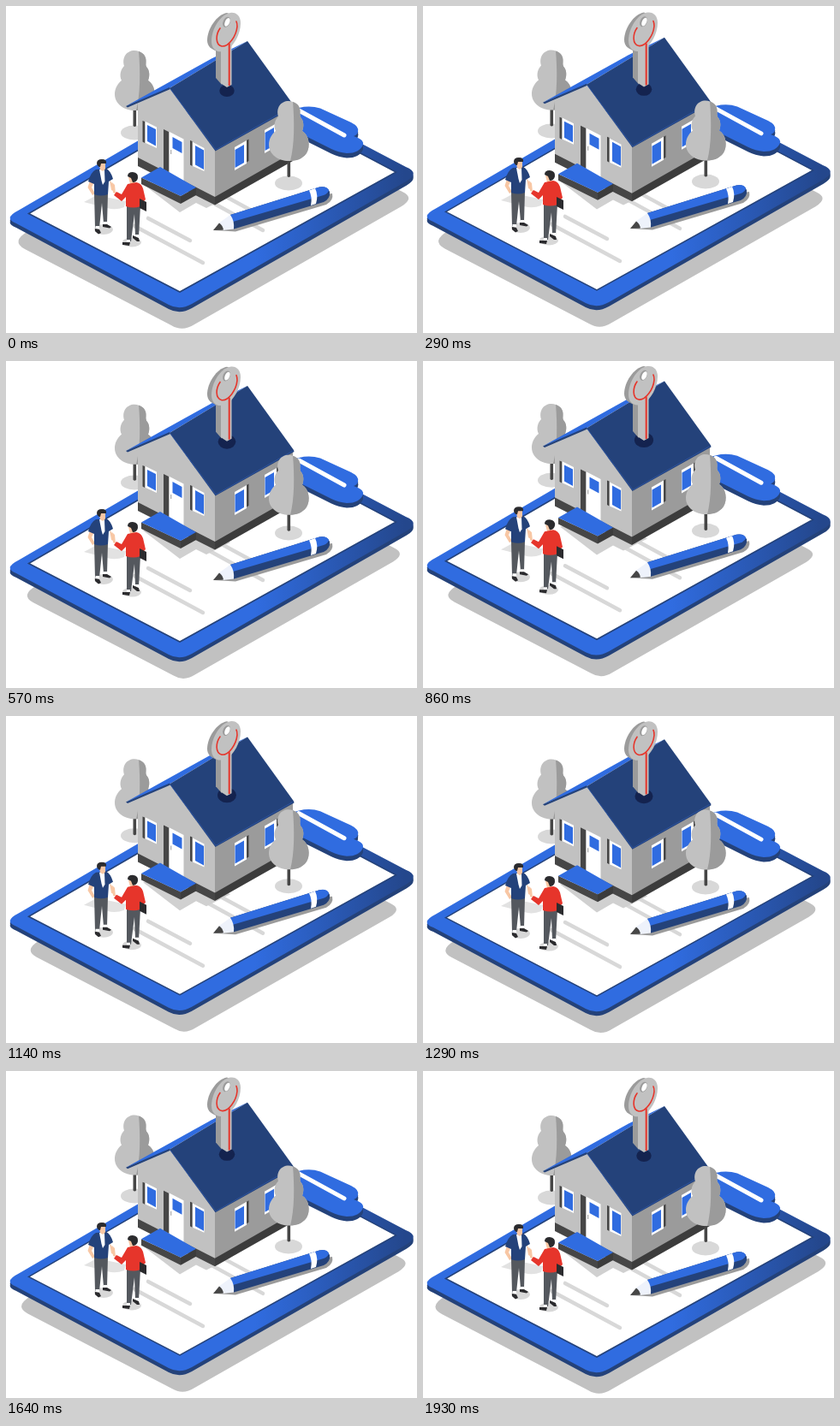
Recreate the animation shown at these times as an HTML page. Size 480 by 382 pixels, loop 2 s.

```html
<!DOCTYPE html>
<html lang="en">
<head>
<meta charset="utf-8">
<title>House on a clipboard</title>
<style>
html, body { margin: 0; width: 100%; height: 100%; overflow: hidden; background: #fff; }
svg { display: block; }
[data-lift] { transform-box: fill-box; transform-origin: center; }
.blue { fill: #306ce0; }
.navy { fill: #24427a; }
.light { fill: #c1c1c1; }
.mid { fill: #9b9b9b; }
.dark { fill: #464646; }
.white { fill: #fff; }
.skin { fill: #f8c7a4; }
.red { fill: #e6352b; }
.black { fill: #2b2b2e; }
.trousers { fill: #54585e; }
.shade { fill: #d8d8d8; }
.line { fill: none; stroke-linecap: round; stroke-linejoin: round; }
</style>
</head>
<body>
<svg width="480" height="382" viewBox="0 0 480 382">
  <defs>
    <linearGradient id="frame" gradientUnits="userSpaceOnUse" x1="290" y1="0" x2="466" y2="0">
      <stop stop-color="#306ce0"/><stop offset="1" stop-color="#24478c"/>
    </linearGradient>
    <path id="board" d="M15 238.500Q-4 248 12 254L190 349Q203 356 217 348L468 204.500Q484 195 467 188L275 87Z"/>
    <path id="clip" d="M330 123Q350 114 367 119.500L403 136Q413 141 411 147Q410 151 406 152L411 154Q418 157 417 162Q413 172 398 172Q388 171 380 167L330 142Z"/>
    <g id="tree">
      <path class="dark" d="M148.500 112h3.600v28q-1.800 2-3.600 0z"/>
      <path class="light" d="M150 52C157 52 164 57 163.500 65Q163 69 164 71C168 75 168 82 166 87C174 92 176 105 171 113C166 120 157 122 150 122C139 122 127 115 127 103C127 97 130 91 135 87C132 81 134 74 138 70C135 60 141 52 150 52Z"/>
      <path class="mid" d="M155 53C162 55 164 61 163.500 65Q163 69 164 71C168 75 168 82 166 87C174 92 176 105 171 113C166 120 159 122 152 122C157 104 157 76 155 53Z"/>
    </g>
    <g id="window">
      <path class="white" d="M267 165L281 157V184L267 192Z"/>
      <path class="blue" d="M267.500 168L278 162V183L267.500 189Z"/>
      <path class="dark" d="M281 157L283.500 155.500V181L281 182.500Z"/>
    </g>
  </defs>

  <path data-lift="0" data-grow="-0.068" class="light" d="M26 263Q5 275 22 284L193 373Q206 381 220 372L462 234Q478 224 463 217L275 118Z"/>

  <g data-lift="9">
    <ellipse class="shade" cx="150" cy="148" rx="16" ry="8.500"/>
    <use href="#board" y="5" class="navy"/>
    <use href="#board" y="2.500" class="navy"/>
    <use href="#board" fill="url(#frame)"/>
    <path class="white" stroke="#24427a" stroke-width="1.600" d="M26.500 242.500L203 334L455.500 194L275 98.500Z"/>
    <use href="#clip" y="5.500" class="navy"/>
    <use href="#clip" y="3" class="navy"/>
    <use href="#clip" class="blue"/>
    <path class="line" stroke="#fff" stroke-width="5" d="M342 122L395 151"/>
    <path class="line" stroke="#d8d8d8" stroke-width="4.500" d="M166 248L215 274M150 257L230 300M218 217L300 262M250 219L285 238"/>
    <ellipse class="shade" cx="330" cy="207" rx="16" ry="8.500"/>
  </g>

  <path data-lift="15" fill="#d0d0d0" d="M160 208L203 241L222 230L234 236L262 222L222 200Z"/>

  <use data-lift="2" href="#tree"/>

  <!-- house -->
  <g data-lift="18">
    <path class="light" d="M154 112L191 96L244 168V224L154 178Z"/>
    <path class="mid" d="M244 168L335 116V172L244 224Z"/>
    <path class="dark" d="M154 177L244 223V232.500L154 187Z"/>
    <path fill="#3c3c3c" d="M244 223L335 171V181L244 232.500Z"/>
    <path class="dark" d="M159.500 134L162 135V160L159.500 158.500Z"/>
    <path class="white" d="M163 135L176 141.500V166L163 160Z"/>
    <path class="blue" d="M165 139L175 144V163.500L165 158Z"/>
    <path class="dark" d="M184 144L190 147V194L184 191Z"/>
    <path class="white" d="M191 147L207.500 155.500V206L191 197Z"/>
    <path class="blue" d="M194.500 153L205.500 159V172L194.500 166Z"/>
    <path stroke="#aaa" stroke-width="1.200" d="M192.700 168V173"/>
    <path class="dark" d="M215 157L217.500 158V187L215 185.500Z"/>
    <path class="white" d="M218 159L231.500 166V193L218 187Z"/>
    <path class="blue" d="M221 163L231 168.500V191L221 185.500Z"/>
    <use href="#window"/>
    <use href="#window" x="35" y="-20"/>
    <path class="dark" d="M158 200.500L204 222V231L158 208Z"/>
    <path fill="#3c3c3c" d="M204 222L222 212V221L204 231Z"/>
    <path class="blue" d="M158 200.500L180 188L222 212L204 222Z"/>
    <path class="blue" d="M140 117L240 61.500L282 41L191 96Z"/>
    <path class="navy" d="M140 117L191 95L192 97L142 118.500Z"/>
    <path class="navy" d="M191 96L282 41L336 116L336.500 118L244.500 169.500Z"/>
    <path class="line" stroke="#2f57a6" stroke-width="0.800" d="M192 97L245 168L335 117"/>
  </g>

  <ellipse data-lift="7" data-grow="0.28" cx="258" cy="99" rx="8.700" ry="7" fill="#14234f"/>

  <!-- key -->
  <g data-lift="2">
    <path class="mid" d="M245 46L252 50V92L245 84Z"/>
    <path class="light" d="M251 46L263.500 42V92L258 95L251 90.500Z"/>
    <path class="mid" d="M258 8C246 10 235 27 235 40C235 47 240 51 247 53L258 51L268 12Z"/>
    <path class="light" d="M262 8C269 7 274 12 274 20C274 33 266 47 257 52C247 56 240 51 240 41C240 27 250 10 262 8Z"/>
    <g transform="rotate(24 258 19)">
      <ellipse class="mid" cx="257.500" cy="19" rx="4" ry="6.300"/>
      <ellipse class="white" cx="258.400" cy="18.800" rx="2.700" ry="5.200"/>
    </g>
    <path class="line" stroke="#e6352b" stroke-width="1.600" d="M250 26C245 33 244 45 252 47C260 48 269 35 270 24Q270 20 269 18"/>
    <path stroke="#e6352b" stroke-width="2" d="M260.700 44V93"/>
  </g>

  <use data-lift="2" href="#tree" x="180" y="59"/>

  <g data-lift="9">
    <!-- pencil -->
    <path class="mid" d="M242 262L268 263.500L374 232Q383 227 381 219L360 222Z"/>
    <path class="navy" d="M262 244L366 211.500Q375 210 378 217Q379 225 371 229L266 260.500Z"/>
    <path class="blue" d="M262 244L366 211.500Q375 210 377 215Q376 219 371 221L265 252Z"/>
    <path class="white" d="M354 215.500L361 213Q365 221 362 231L356 233Q358 223 354 215.500Z"/>
    <path fill="#eef2fb" d="M248 254L262 244Q267 251 266 260.500L253 262Z"/>
    <path class="dark" d="M242 262L249 253.500Q253 256 254 261.500Z"/>

    <!-- people -->
    <path fill="#e2e2e2" d="M91 229L106 221L140 228L138 235Q128 239 118 236Z"/>
    <ellipse class="shade" cx="114" cy="261" rx="11" ry="6"/>
    <ellipse class="shade" cx="147" cy="276" rx="11" ry="5.500"/>

    <path class="skin" d="M98 204L95.500 212L101 221L104 219L100 212L103 205ZM121 203L126 210L127 217L123 215Z"/>
    <path class="trousers" d="M103 219H119L118 254H114L112 230L109 259H104Z"/>
    <path class="white" d="M104.500 257H109V260H104.500ZM114 252H118V255H114Z"/>
    <path class="black" d="M104 260L109 261L111 265L108 266.500L104 263ZM113 255H118L123 258L121 259.500L113 258Z"/>
    <path class="navy" d="M105 191L117 190Q122 192 125 202L120 205L119 220Q111 223 103 220L103 208L96 205Q99 194 105 191Z"/>
    <path class="white" d="M109 191H115L115.500 205L113 209L111.500 204Z"/>
    <path class="skin" d="M108 183H116V190Q114 195 110 191Z"/>
    <path class="black" d="M106 184Q106 179 112 179Q118 179 117 184L111 184L110 188Q107 188 106 184Z"/>

    <path class="skin" d="M143 200H150V208H145ZM124 206L127 209L128 219L125 218Z"/>
    <path class="trousers" d="M141 233H157L155 270L151 269L150 243L146 275H141Z"/>
    <path class="white" d="M141 273H145V276H141ZM150 267H155V270H150Z"/>
    <path class="black" d="M136 276L145 276L144 280L136 279ZM148 268L155 271L156 275L153 275L148 271Z"/>
    <path class="red" d="M142 208L152 206Q158 207 160 213L163 226L158 231L157 234Q149 237 140 234L140 223L135 228L126 221L129 217L135 220Z"/>
    <path class="black" d="M156 225L164 229V240L156 236Z"/>
    <path class="black" d="M142 199Q142 194 148 194Q155 195 154 201Q153 206 148 206L146 201Z"/>
  </g>
</svg>
<script>
const LOOP = 2000, STEPS = 28;
const parts = [...document.querySelectorAll("[data-lift]")];

// Everything bobs together; each part has its own height and growth.
function draw(ms) {
  const step = Math.floor((ms % LOOP + 5) * STEPS / LOOP);
  const rise = (1 - Math.cos((step + 0.5) / STEPS * 2 * Math.PI)) / 2;
  for (const { style, dataset: { lift, grow = 0 } } of parts) {
    style.transform = `translateY(${-lift * rise}px) scale(${1 + grow * rise})`;
  }
}

const start = performance.now();
function tick() {
  draw(performance.now() - start);
  requestAnimationFrame(tick);
}
tick();
</script>
</body>
</html>
```
